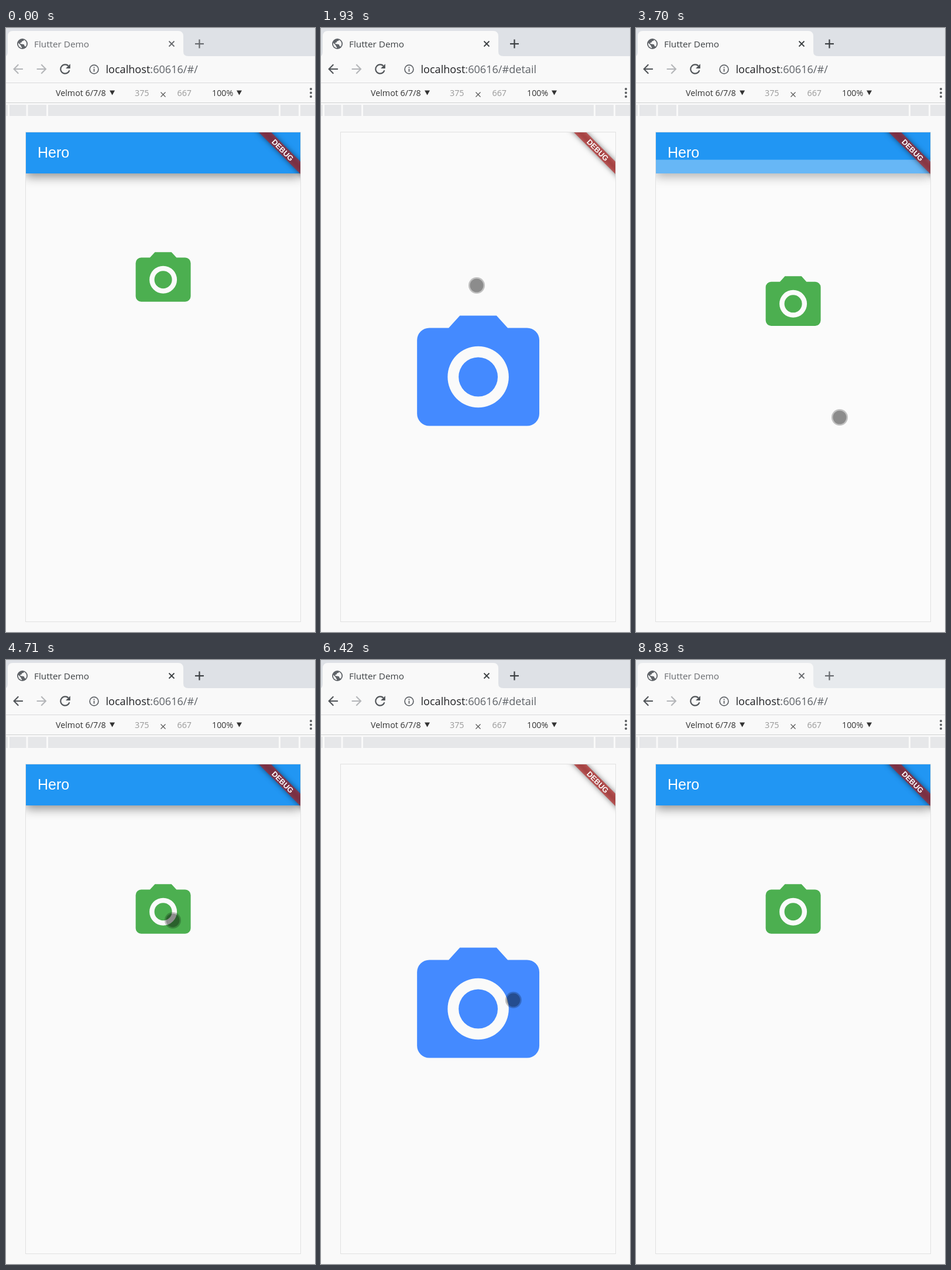
Animation of 528 by 1030 pixels, one loop 8.92 s. Source, as an HTML page with a canvas:

```html
<!DOCTYPE html>
<html lang="en">
<head>
<meta charset="utf-8">
<title>Hero transition</title>
<style>
html, body { margin: 0; width: 528px; height: 1030px; overflow: hidden; background: #f9f9f9; }
canvas { display: block; }
</style>
</head>
<body>
<canvas id="stage" width="528" height="1030"></canvas>
<script>
const ctx = document.getElementById('stage').getContext('2d');
const LOOP = 8920, FIRST = 280, FRAME = 77.7;
const FOCUS = 1280, BLUR = 8820;
const UI = '"Open Sans", "Noto Sans", sans-serif';
const APP = '"Liberation Sans", Arial, sans-serif';
const PAGE = '#f9f9f9', GREY = '#5f6368', DARK = '#505458', PALE = '#b4b6b9';
const PHONE = { x: 34, y: 178, w: 469, h: 834 };
const DP = 470 / 375;
const HOME = 429.2, DETAIL = 595;

// Key positions of the pointer: time, x, y
const pointer = [
  [280, 400, 868], [910, 266, 439], [2083, 266, 439], [2310, 323, 683],
  [2700, 348, 664], [4160, 348, 664], [4708, 285, 444], [5400, 275, 431],
  [5797, 277, 433], [6100, 286, 541], [6420, 329, 580], [7040, 329, 580],
  [7273, 388, 697], [7600, 496, 969]
];

// Address change and start of the page transition
const routes = [
  { at: 1520, start: 1610, push: true }, { at: 3540, start: 3549, push: false },
  { at: 5560, start: 5566, push: true }, { at: 7035, start: 7141, push: false }
];

const clamp = v => Math.min(1, Math.max(0, v));
const mix = (a, b, k) => a + (b - a) * k;

function bezier(x1, y1, x2, y2) {
  const at = (a, b, s) => 3 * a * s * (1 - s) ** 2 + 3 * b * s * s * (1 - s) + s ** 3;
  return x => {
    let lo = 0, hi = 1;
    for (let i = 0; i < 24; i++) {
      const mid = (lo + hi) / 2;
      if (at(x1, x2, mid) < x) lo = mid; else hi = mid;
    }
    return at(y1, y2, (lo + hi) / 2);
  };
}
const fastOutSlowIn = bezier(0.4, 0, 0.2, 1);
const easeIn = bezier(0.42, 0, 1, 1);

// The screen refreshes at a steady low rate
const heldTime = t => t < FIRST ? 0 : FIRST + Math.floor((t - FIRST) / FRAME) * FRAME;

function pointerAt(t) {
  const i = pointer.findIndex(p => p[0] > t);
  if (i < 1) return null;
  const [t0, x0, y0] = pointer[i - 1], [t1, x1, y1] = pointer[i];
  const k = (t - t0) / (t1 - t0);
  return [mix(x0, x1, k), mix(y0, y1, k)];
}

function rect(x, y, w, h, color) {
  ctx.fillStyle = color;
  ctx.fillRect(x, y, w, h);
}

function text(str, x, y, size, color, family = UI, weight = 400) {
  ctx.font = `${weight} ${size}px ${family}`;
  ctx.fillStyle = color;
  ctx.fillText(str, x, y);
  return ctx.measureText(str).width;
}

function trace(points) {
  ctx.beginPath();
  for (const [x, y] of points) ctx.lineTo(x, y);
}

function line(points, width, color) {
  trace(points);
  ctx.lineWidth = width;
  ctx.strokeStyle = color;
  ctx.stroke();
}

function polygon(points, color) {
  trace(points);
  ctx.fillStyle = color;
  ctx.fill();
}

function arc(x, y, r, from, to, width, color) {
  ctx.beginPath();
  ctx.arc(x, y, r, from, to);
  ctx.lineWidth = width;
  ctx.strokeStyle = color;
  ctx.stroke();
}

function disc(x, y, r, color) {
  ctx.beginPath();
  ctx.arc(x, y, r, 0, Math.PI * 2);
  ctx.fillStyle = color;
  ctx.fill();
}

// Runs paint in a 24-unit icon box centred on a point
function icon(cx, cy, scale, paint, flip = 1) {
  ctx.save();
  ctx.translate(cx, cy);
  ctx.scale(scale * flip, scale);
  ctx.translate(-12, -12);
  paint();
  ctx.restore();
}

function arrow(x, color, flip) {
  icon(x, 70, 1.05, () => {
    line([[12.7, 4.7], [5.4, 12], [12.7, 19.3]], 2, color);
    line([[5.4, 12], [20, 12]], 2, color);
  }, flip);
}

function reload() {
  arc(12, 12, 7, 0.29, Math.PI * 1.75, 2, DARK);
  polygon([[20, 4], [20, 11], [13, 11]], DARK);
}

function globe() {
  disc(12, 12, 10, GREY);
  ctx.fillStyle = PAGE;
  ctx.beginPath();
  ctx.arc(12, 12, 8, 1.7, 3.37);
  ctx.lineTo(9, 15);
  ctx.lineTo(9.6, 17.4);
  ctx.lineTo(11, 18);
  ctx.fill();
  ctx.beginPath();
  ctx.arc(12, 12, 8, -1.18, 0.74);
  for (const [x, y] of [[16, 16], [15, 13], [8, 12], [8, 10], [11, 9], [11, 7], [14, 6.4]]) ctx.lineTo(x, y);
  ctx.fill();
}

function camera(y, unit, color) {
  icon(268.6, y, unit, () => {
    ctx.beginPath();
    ctx.roundRect(2, 4, 20, 16, 2);
    ctx.moveTo(9, 2);
    for (const [px, py] of [[15, 2], [16.83, 4], [16.83, 5], [7.17, 5], [7.17, 4]]) ctx.lineTo(px, py);
    ctx.closePath();
    ctx.moveTo(17, 12);
    ctx.arc(12, 12, 5, 0, Math.PI * 2, true);
    ctx.moveTo(15.2, 12);
    ctx.arc(12, 12, 3.2, 0, Math.PI * 2);
    ctx.fillStyle = color;
    ctx.fill();
  });
}
const greenCamera = y => camera(y, 90 * DP / 24, '#4caf50');
const blueCamera = y => camera(y, 200 * DP / 24, '#448aff');

function cross(x, y, r, width, color) {
  line([[x - r, y - r], [x + r, y + r]], width, color);
  line([[x + r, y - r], [x - r, y + r]], width, color);
}

function drawTab(t) {
  const ink = t >= FOCUS && t < BLUR ? '#3c4043' : '#686b6f';
  rect(0, 0, 528, 48, t >= BLUR ? '#e7eaed' : '#dee1e6');
  ctx.beginPath();
  ctx.moveTo(0, 48);
  ctx.quadraticCurveTo(3, 46, 3, 40);
  ctx.arcTo(3, 5, 11, 5, 8);
  ctx.arcTo(303, 5, 303, 13, 8);
  ctx.lineTo(303, 40);
  ctx.quadraticCurveTo(303, 48, 311, 48);
  ctx.fillStyle = PAGE;
  ctx.fill();
  icon(28, 27, 0.9, globe);
  text('Flutter Demo', 48, 33, 15.3, ink);
  cross(283, 27, 4.5, 1.8, ink);
  line([[323, 27], [338, 27]], 2.2, ink);
  line([[330.5, 19.5], [330.5, 34.5]], 2.2, ink);
}

function drawAddress(t, detail) {
  arrow(20.5, t >= routes[0].at ? DARK : PALE);
  arrow(61, PALE, -1);
  icon(101, 70, 1.1, reload);
  arc(150.5, 70.5, 7.4, 0, Math.PI * 2, 1.7, GREY);
  rect(149.6, 69.5, 1.8, 5, GREY);
  rect(149.6, 66.3, 1.8, 1.8, GREY);
  const w = text('localhost', 170.5, 77, 18.1, '#202124');
  text(':60616/#' + (detail ? 'detail' : '/'), 170.5 + w, 77, 18.1, GREY);
}

function drawDeviceBar() {
  const label = (str, x, color) => text(str, x, 116, 14.3, color);
  rect(0, 93, 528, 1, '#d9dadb');
  rect(0, 127, 528, 1, '#cfd0d1');
  label('Velmot 6/7/8', 85, '#333');
  label('375', 220, '#999');
  label('667', 292.5, '#999');
  label('100%', 352, '#333');
  cross(268.5, 113.5, 4, 1.1, '#555');
  for (const x of [177, 394]) polygon([[x, 106.5], [x + 9, 106.5], [x + 4.5, 114.5]], '#333');
  for (let i = -1; i <= 1; i++) disc(521, 110.5 + i * 6.5, 2, '#5a5d60');
  rect(0, 131, 528, 19, '#e6e7e9');
  for (const x of [3, 34.5, 69, 466, 500]) rect(x, 131, 3, 19, PAGE);
}

function drawHeader() {
  const { x, y, w } = PHONE, h = 70;
  ctx.save();
  ctx.shadowColor = 'rgba(0,0,0,0.42)';
  ctx.shadowBlur = 16;
  ctx.shadowOffsetY = 6;
  rect(x, y, w, h, '#2196f3');
  ctx.restore();
  text('Hero', 54, 221, 20 * DP, '#fff', APP);
}

function drawBanner() {
  const size = 12 * DP, top = 28 * DP, half = 60 * DP;
  ctx.save();
  ctx.translate(PHONE.x + PHONE.w, PHONE.y);
  ctx.rotate(Math.PI / 4);
  ctx.filter = 'blur(5px)';
  rect(-half, top, half * 2, size, 'rgba(0,0,0,0.5)');
  ctx.filter = 'none';
  rect(-half, top, half * 2, size, 'rgba(183,28,28,0.627)');
  ctx.textAlign = 'center';
  text('DEBUG', 0, top + size / 2 + 4.6, 12.8, '#fff', APP, 700);
  ctx.restore();
}

function drawPhone(t, route) {
  const { x, y, w, h } = PHONE;
  const run = route ? clamp((t - route.start) / 300) : 0;
  const push = !!route && route.push;
  const v = push ? run : route ? 1 - run : 0;
  const flying = run > 0 && run < 1;

  ctx.strokeStyle = '#e1e1e1';
  ctx.lineWidth = 1;
  ctx.strokeRect(x - 0.5, y - 0.5, w + 1, h + 1);
  ctx.save();
  ctx.beginPath();
  ctx.rect(x, y, w, h);
  ctx.clip();
  rect(x, y, w, h, '#fafafa');
  if (v < 1) drawHeader();
  if (v > 0) {
    ctx.globalAlpha = easeIn(v);
    rect(x, y + h / 4 * (1 - fastOutSlowIn(v)), w, h, '#fafafa');
    ctx.globalAlpha = 1;
  }
  // The icon flies along a slight arc, bent towards the detail page
  const k = fastOutSlowIn(run);
  const d = flying ? (push ? k : 1 - k) : v;
  const iconY = mix(HOME, DETAIL, d + 0.13 * d * (1 - d));
  if (push) {
    if (run > 0) blueCamera(iconY);
    else greenCamera(HOME);
  } else if (v === 1) {
    blueCamera(DETAIL);
  } else {
    greenCamera(iconY);
  }
  drawBanner();
  ctx.restore();
}

function drawPointer(t) {
  const p = pointerAt(t);
  if (!p) return;
  disc(p[0], p[1], 14, 'rgba(0,0,0,0.23)');
  disc(p[0], p[1], 11.5, 'rgba(0,0,0,0.27)');
}

function draw(now) {
  const t = heldTime(now % LOOP);
  const route = routes.filter(r => r.at <= t).pop();
  rect(0, 0, 528, 1030, PAGE);
  drawTab(t);
  drawAddress(t, !!route && route.push);
  drawDeviceBar();
  drawPhone(t, route);
  drawPointer(t);
}

const begin = performance.now();
function tick() {
  draw(performance.now() - begin);
  requestAnimationFrame(tick);
}
tick();
</script>
</body>
</html>
```
